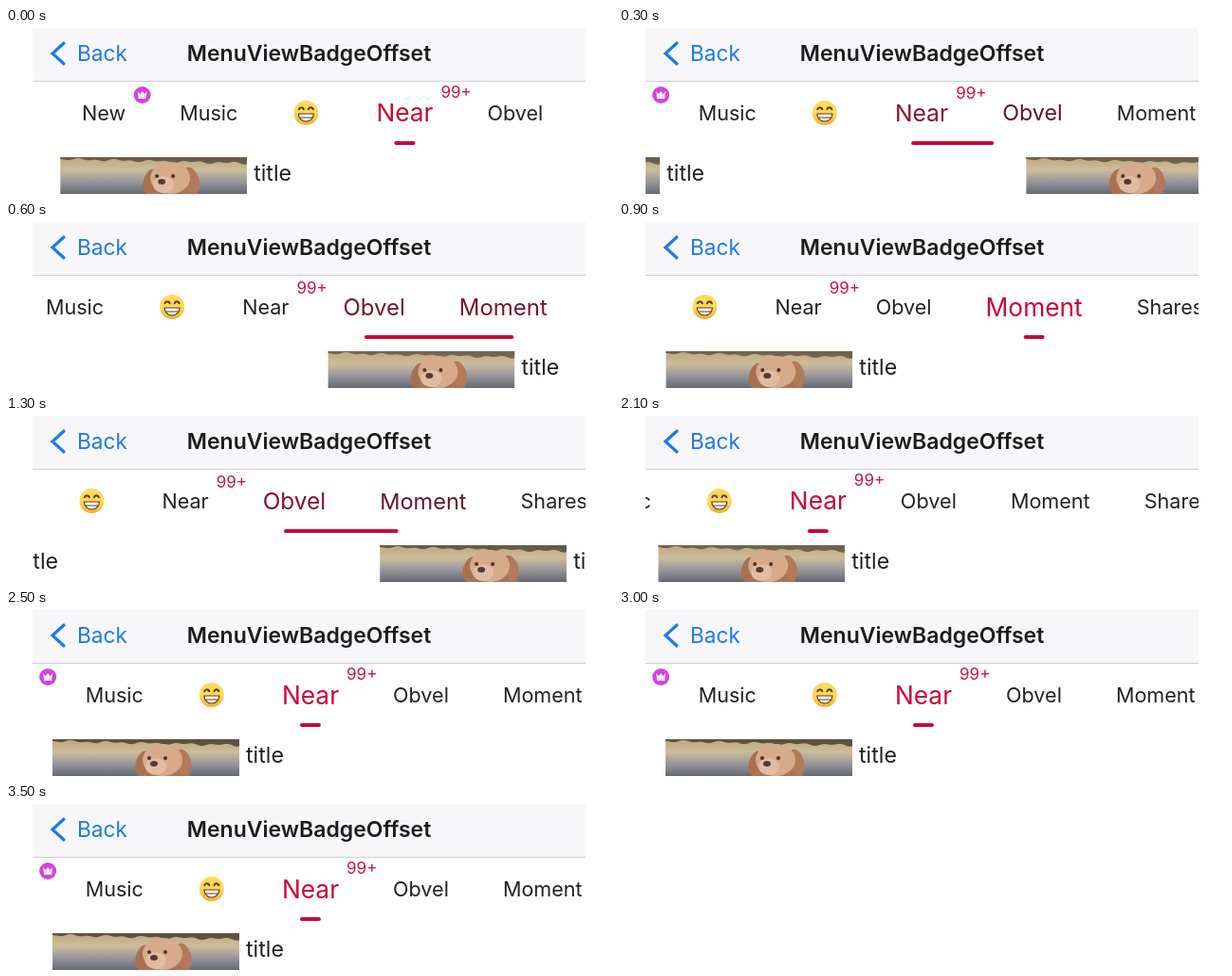
Write an HTML page with a canvas that moves like this. It is 640x176 px and loops after 5.5 s.

```html
<!DOCTYPE html>
<html lang="en">
<head>
<meta charset="utf-8">
<title>MenuViewBadgeOffset</title>
<style>
html, body { margin: 0; width: 100%; height: 100%; overflow: hidden; background: #fff; }
canvas { display: block; }
</style>
</head>
<body>
<canvas id="stage" width="640" height="176"></canvas>
<script>
const ctx = document.getElementById('stage').getContext('2d');
const LOOP = 5500, STEP = 100;
const LEFT = 28, RIGHT = 611, PAGE = RIGHT - LEFT;
const GAP = 57, ZOOM = 0.22, BAR = 11, FONT = 21.6, MIDDLE = 90;

const items = [
  { label: 'New', crown: true },
  { label: 'Music' },
  { emoji: true, width: 32 },
  { label: 'Near', badge: '99+' },
  { label: 'Obvel' },
  { label: 'Moment' },
  { label: 'Shares' },
];

const mix = (a, b, k) => a + (b - a) * k;
const clamp01 = v => Math.max(0, Math.min(1, v));
const ease = k => k * k * (3 - 2 * k);
const glide = (time, start, end) => ease(clamp01((time - start) / (end - start)));
const tint = k => `rgb(${mix(34, 200, k)}, ${mix(34, 8, k)}, ${mix(36, 56, k)})`;

// Two pages forward, then one back, and one more back.
const pageAt = t => 2.986 + 2.014 * glide(t, 100, 840)
  - glide(t, 890, 1620) - glide(t, 1620, 2135);

// The menu scrolls after the selection and drifts a little in between.
const menuAt = t => 80 - 99.5 * glide(t, 0, 300) - 126.5 * glide(t, 450, 840)
  + 16 * glide(t, 1300, 2200) + 110.5 * glide(t, 2100, 2450);

function text(string, x, y, size, color, align = 'left', weight = 400) {
  ctx.font = `${weight} ${size}px Inter, sans-serif`;
  ctx.textAlign = align;
  ctx.fillStyle = color;
  ctx.fillText(string, x, y);
}

function ellipse(x, y, rx, ry, color, turn = 0) {
  ctx.fillStyle = color;
  ctx.beginPath();
  ctx.ellipse(x, y, rx, ry, turn, 0, 7);
  ctx.fill();
}

function gradient(height, ...colors) {
  const fill = ctx.createLinearGradient(0, 0, 0, height);
  colors.forEach((color, i) => fill.addColorStop(i / (colors.length - 1), color));
  return fill;
}

function navBar() {
  ctx.fillStyle = '#f7f7f9';
  ctx.fillRect(LEFT, 0, PAGE, 56);
  ctx.fillStyle = '#cfcfd1';
  ctx.fillRect(LEFT, 56, PAGE, 1);
  ctx.strokeStyle = '#1f7ae0';
  ctx.lineWidth = 3.2;
  ctx.lineCap = 'round';
  ctx.beginPath();
  ctx.moveTo(61, 16);
  ctx.lineTo(49, 27);
  ctx.lineTo(61, 38);
  ctx.stroke();
  text('Back', 75, 35, 22.6, '#1f7ae0');
  text('MenuViewBadgeOffset', 319.5, 35, 23, '#1c1c1e', 'center', 600);
}

function grin(x, y) {
  ctx.save();
  ctx.translate(x, y);
  ellipse(0, 0, 13, 13, gradient(13, '#ffd95a', '#eeb031'));
  ctx.strokeStyle = '#5c3b16';
  ctx.lineWidth = 2;
  for (const eye of [-5, 5]) {
    ctx.beginPath();
    ctx.arc(eye, -3, 2.6, Math.PI * 1.1, Math.PI * 1.9);
    ctx.stroke();
  }
  ctx.fillStyle = '#fff';
  ctx.lineWidth = 1.2;
  ctx.beginPath();
  ctx.ellipse(0, 1, 8, 8, 0, 0, Math.PI);
  ctx.closePath();
  ctx.moveTo(-7, 5);
  ctx.lineTo(7, 5);
  ctx.fill();
  ctx.stroke();
  ctx.restore();
}

function crown(x, y) {
  ellipse(x, y, 9, 9, '#cf45dc');
  ctx.fillStyle = '#fbe6ff';
  ctx.beginPath();
  ctx.moveTo(x - 4, y + 4);
  for (let i = 0; i < 5; i++) ctx.lineTo(x - 5 + i * 2.5, y - (i % 2 ? 1 : 4));
  ctx.lineTo(x + 4, y + 4);
  ctx.fill();
}

function menu(page, left) {
  const centers = items.map((item, i) => {
    const focus = clamp01(1 - Math.abs(page - i));
    const scale = 1 + ZOOM * focus;
    const width = item.width * scale;
    const center = left + width / 2;
    const end = left + width;
    if (item.emoji) grin(left + 15, MIDDLE);
    else text(item.label, center, MIDDLE + 7.8 * scale, FONT * scale, tint(focus), 'center');
    if (item.badge) text(item.badge, end + 8, 76 - 2 * focus, 17, '#c81443');
    if (item.crown) crown(end + 17.5, 71);
    left = end + GAP;
    return center;
  });

  // The leading end moves in the first half, the trailing end in the second.
  const i = Math.floor(page), part = 2 * ease(page - i);
  const start = mix(centers[i], centers[i + 1], clamp01(part - 1)) - BAR;
  const end = mix(centers[i], centers[i + 1], clamp01(part)) + BAR;
  ctx.fillStyle = tint(1);
  ctx.beginPath();
  ctx.roundRect(start, 120, end - start, 4, 2);
  ctx.fill();
}

function photo(x, y) {
  ctx.save();
  ctx.translate(x, y);
  ctx.beginPath();
  ctx.rect(0, 0, 197, 40);
  ctx.clip();
  ctx.fillStyle = gradient(40, '#bfa578', '#cdbd9c', '#94949a', '#62666f');
  ctx.fillRect(0, 0, 197, 40);
  ctx.fillStyle = '#5a5243';
  for (let i = 0; i < 197; i++) {
    ctx.fillRect(i, 0, 1, 2 + i / 45 + 1.5 * Math.sin(i / 4) * Math.sin(i / 11));
  }
  ellipse(118, 44, 30, 14, '#a97358');
  ellipse(95, 25, 7, 13, '#a9704f', 0.3);
  ellipse(138, 24, 8, 14, '#b27a58', -0.3);
  ellipse(116, 22, 21, 17, '#d6aa8a');
  ellipse(109, 29, 11, 9, '#e0bda2');
  for (const eye of [102, 119]) ellipse(eye, 20, 2, 2, '#493127');
  ellipse(107, 26, 4, 3, '#573b33');
  ctx.restore();
}

function draw(time) {
  const page = pageAt(time);
  ctx.fillStyle = '#fff';
  ctx.fillRect(0, 0, 640, 176);
  navBar();
  ctx.save();
  ctx.beginPath();
  ctx.rect(LEFT, 57, PAGE, 119);
  ctx.clip();
  menu(page, menuAt(time));
  for (let n = Math.floor(page) - 1; n <= page + 2; n++) {
    const x = 49 + (n - page) * PAGE;
    photo(x, 137);
    text('title', x + 204, 162, 23.2, '#202022');
  }
  ctx.restore();
}

function tick() {
  const time = performance.now() % LOOP;
  draw(Math.floor(time / STEP) * STEP);
  requestAnimationFrame(tick);
}

ctx.font = `${FONT}px Inter, sans-serif`;
for (const item of items) item.width ??= ctx.measureText(item.label).width;
tick();
</script>
</body>
</html>
```
